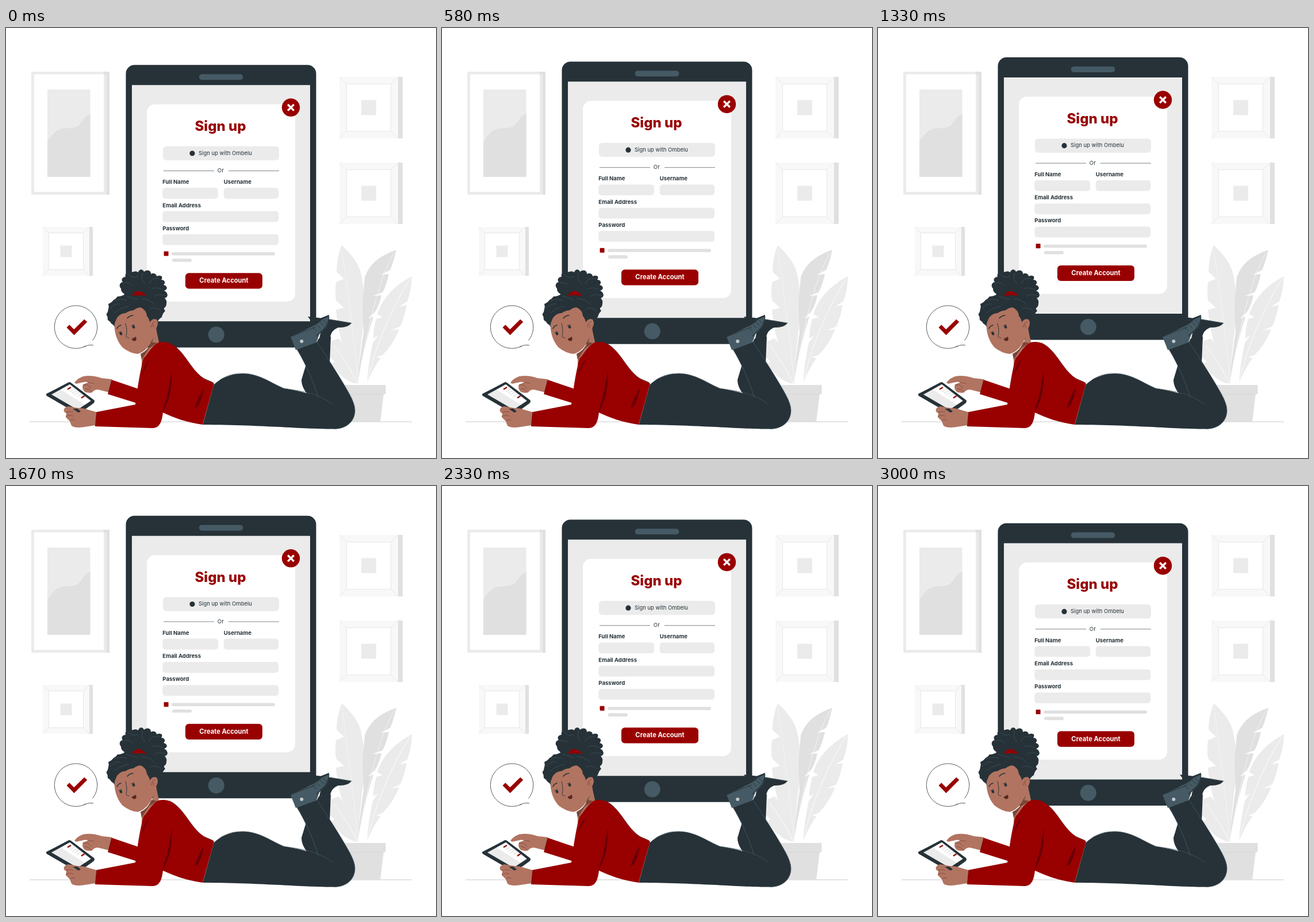
An HTML page with a canvas that plays this animation: 748 px wide and 748 px high, repeating every 3.04 s.

```html
<!DOCTYPE html>
<html lang="en">
<head>
<meta charset="utf-8">
<title>Sign up</title>
<style>
  html, body { margin: 0; width: 100%; height: 100%; overflow: hidden; background: #fff; }
  canvas { display: block; width: 748px; height: 748px; }
</style>
</head>
<body>
<canvas id="stage"></canvas>
<script>
const SIZE = 748, LOOP = 3040, FLOAT = 3000, LIFT = 14.96, STEP = 1000 / 24;
const DARK = '#263238', SLATE = '#455a64', RED = '#990000', DEEP = '#650007';
const SKIN = '#b17461', SHADE = '#7b4537', G1 = '#ebebeb', G2 = '#e0e0e0', G3 = '#f8f8f8';

const canvas = document.getElementById('stage');
const dpr = window.devicePixelRatio || 1;
canvas.width = canvas.height = SIZE * dpr;
const ctx = canvas.getContext('2d');

function fill(d, color) {
  ctx.fillStyle = color;
  ctx.fill(new Path2D(d));
}

function line(d, color, width = 0.7) {
  ctx.strokeStyle = color;
  ctx.lineWidth = width;
  ctx.stroke(new Path2D(d));
}

function box(x, y, w, h, color, r = 0) {
  ctx.fillStyle = color;
  ctx.beginPath();
  ctx.roundRect(x, y, w, h, r);
  ctx.fill();
}

function dot(x, y, r, color, ry = r, turn = 0) {
  ctx.fillStyle = color;
  ctx.beginPath();
  ctx.ellipse(x, y, r, ry, turn, 0, Math.PI * 2);
  ctx.fill();
}

function text(str, x, y, size, weight, color, align = 'left') {
  ctx.font = `${weight} ${size}px Inter, "Open Sans", sans-serif`;
  ctx.textAlign = align;
  ctx.fillStyle = color;
  ctx.fillText(str, x, y);
}

// Closed outline whose edges bulge outwards, walked clockwise
function curls(pts, bulge) {
  let d = `M${pts[0]}`;
  pts.forEach(([x, y], i) => {
    const [u, v] = pts[(i + 1) % pts.length];
    d += `Q${(x + u) / 2 + (v - y) * bulge} ${(y + v) / 2 - (u - x) * bulge} ${u} ${v}`;
  });
  return d + 'Z';
}

function wallFrame(x, y, w, h, side, rim, mid) {
  box(x, y, w + side, h, G2);
  box(x, y, w, h, G3);
  const [l, t, r, b] = [x + rim, y + rim, x + w - rim, y + h - rim];
  box(l, t, r - l, b - t, '#fff');
  line(`M${l} ${t}H${r}V${b}H${l}Z M${x} ${y}L${l} ${t}M${x + w} ${y}L${r} ${t}` +
       `M${x} ${y + h}L${l} ${b}M${x + w} ${y + h}L${r} ${b}`, G2);
  box(x + w / 2 - mid / 2, y + h / 2 - mid / 2, mid, mid, G1);
}

function wall() {
  box(44, 76, 136, 214, G2);
  box(44, 76, 126, 214, G1);
  box(49, 80.5, 121, 204.5, '#fff');
  box(170, 80.5, 5, 209.5, G1);
  box(72, 107, 74.5, 152, G1);
  fill('M72 198C78 188 87 176 99 175C118 173 123 175 130 165C136 157 139 152 146.5 149V259H72Z', G2);
  wallFrame(580, 85, 102, 107, 8, 12.5, 26);
  wallFrame(580, 234, 102, 107, 8, 12.5, 26);
  wallFrame(64, 346, 81, 85, 6, 10.5, 20);
  line('M41 685H706', '#c9c9c9', 1.1);
}

function plant() {
  fill('M612 619C598 617 581 608 566 584L571 580L562 571L566 545L578 540C592 552 604 588 612 619Z', G1);
  fill('M613 619C596 585 578 540 574 490L588 487L574 474Q572 458 574 442L588 436L575 424Q575 400 584 378C601 394 617 411 620 440Q625 466 622 512C617 553 613 590 613 619Z', G1);
  fill('M612 619C614 585 619 550 622 530L620 480L624 434C633 408 653 395 679 386C676 398 673 411 668 421L652 429L666 428Q662 447 655 460L638 466L653 465Q650 481 642 494L630 505L639 502C631 527 618 575 612 619Z', G2);
  fill('M628 619C629 596 633 572 638 548L647 535L639 540Q639 524 644 506L655 503L646 498C655 467 681 445 706 432Q706 455 698 476L684 484L697 482Q694 500 686 519L670 526L684 524Q673 551 655 569L643 573L652 574Q639 590 628 619Z', G1);
  line('M584 384C591 430 605 540 613 619M676 390C650 430 629 520 612 617', '#f5f5f5', 0.9);
  line('M703 436C675 480 642 550 628 619M570 552C588 574 603 600 611 619', '#fff', 0.9);
  fill('M580 636H657L651 685H588Z', G2);
  box(574, 621, 86.5, 16, G2);
  line('M582 637.2H656', '#d6d6d6', 1);
}

function field(label, x, y, w) {
  text(label, x, y - 7, 9.6, 700, DARK);
  box(x, y, w, 18.8, G1, 5);
}

function tablet(lift) {
  ctx.save();
  ctx.translate(0, 0.4 - lift);
  box(208.5, 64.3, 331, 491.4, DARK, 15);
  box(219, 99.2, 310, 411, G1);
  box(335.8, 80.2, 76.5, 10, SLATE, 5);
  dot(365.8, 533.4, 14, SLATE);
  box(245, 132.7, 258, 343, '#fff', 14);

  dot(495.5, 138.3, 15.7, RED);
  ctx.lineCap = 'butt';
  line('M490.2 133L500.8 143.6M500.8 133L490.2 143.6', '#fff', 3.4);

  text('Sign up', 373, 179, 24, 800, RED, 'center');
  box(273, 205.7, 202, 24.5, G1, 6);
  dot(324, 218, 4.6, DARK);
  text('Sign up with Ombelu', 335, 220.7, 9.5, 400, DARK);
  line('M274 248.5H362M387 248.5H475', DARK, 0.6);
  text('Or', 373.3, 251.2, 9.6, 400, DARK, 'center');

  field('Full Name', 272.3, 278.1, 96.8);
  field('Username', 378.8, 278.1, 95.3);
  field('Email Address', 272.3, 318.6, 201.8);
  field('Password', 272.3, 358.8, 201.8);

  box(274.6, 388.6, 8, 8, RED, 1);
  box(288, 390, 180, 5.6, G2, 2.8);
  box(289, 401.2, 34, 5.6, G2, 2.8);
  box(312, 426.2, 134, 27.2, RED, 6);
  text('Create Account', 379, 443.2, 11.2, 700, '#fff', 'center');
  ctx.restore();
}

function badge() {
  fill('M121.5 483A37 37 0 1 0 121.5 557A37 37 0 1 0 121.5 483Z', '#fff');
  line('M139 553A37.2 37.2 0 1 1 150.5 543.5M135 555Q144 550 152 552', DARK, 0.8);
  fill('M105.5 521L110.3 516.3L118.3 524.3L136.2 506.8L141.2 511.2L118.6 534.2Z', RED);
}

function legs() {
  // far leg and shoe
  fill('M525 502L560 506L601.5 513Q594 522 578 521Q565 526 564 539L545 540L549 522L534 514Z', DARK);
  line('M560 507L600 513.5', SLATE, 0.6);
  fill('M544 540L565 537L563 585L556 640L540 652Q514 632 514 612L523 582Z', DARK);
  // near leg
  fill('M361 621C372 610 390 601 412 601C441 601 463 619 484 627C505 630 526 635 542 642C535 614 519 580 506 559L541 546C557 571 580 605 597 636Q607 654 607 665C607 684 593 697 571 697.5C520 698 460 691 342 690Z', DARK);
  line('M372 612C388 602 400 601 412 601C441 601 463 619 484 627C510 631 542 634 568 655', SLATE, 0.7);
  line('M543 643C535 614 519 580 506 559M541 546C557 571 580 605 597 636Q607 654 607 665C607 684 593 697 571 697.5', SLATE, 0.8);
  line('M361 621L342 690', '#a9b2b5', 0.7);
  // near shoe
  fill('M495 537L521 525Q541 514 548 505L562 499Q563 509 557 520L545 533L540 547L504 560Z', SLATE);
  fill('M524 522Q541 514 548 504.5L562 499L561 502L550 507Q540 518 524 522Z', DARK);
  line('M541 517L547 522M546 512L553 518M551 508L557 514M533 521L540 527M495 537L539 520', DARK, 0.9);
  line('M562 502Q560 518 549 527L540 536', DARK, 1.1);
  dot(514.3, 545, 3, '#c4c9cb');
}

function handTablet() {
  fill('M70 636.5Q89 627 109 616.3Q111 615.5 113 617L153.5 647.5Q155 650 152 653L129 669.5Q125 672 121 669L71 640Q69 638 70 636.5Z', DARK);
  fill('M79 637.5L111 620L147.5 648.5L124.5 664Z', G1);
  fill('M95 629L111 620L147.5 648.5L137 655.5Z', '#fff');
  line('M107 628.5L113 625', RED, 2.2);
  line('M131 643.5L136.5 640', RED, 2.4);
  line('M111 633L121 627M115 635.5L125 630M119 638.5L128 633M124 641L132 636', '#c5c5c5', 0.8);
}

function arms() {
  // pointing hand
  fill('M184 611L166 609Q149 603 134 606Q122 611 119.3 617Q121 620 126 618L138 615.5L143 616.5L134 620Q131 627 137 633Q144 636 150 634Q153 629 160 629L180 634Z', SKIN);
  line('M143 616.5L153 618M134 621L142 621L148 627M137 627L144 629L148 633', SHADE, 0.8);
  // holding hand
  fill('M157 668L143 664Q135 661 125 661L108 658Q101 660 100.5 665Q101 669 105 670L104 677L111 684L114 692Q120 696 133 694.5L156 691Z', SKIN);
  fill('M116 662.5L126 669L130 667L124 662Z', DARK);
  line('M105 669Q110 666 117 668M104 676Q110 672 117 675M111 684Q114 680 120 682', SHADE, 0.8);
  fill('M184 612L231 628L235 655L177.5 637Z', RED);
  line('M184 612L177.5 637', DEEP, 0.8);
}

function torso() {
  fill('M236 572C247 563 260 541 260 518L266 546L258 570L236 588Z', SKIN);
  fill('M234 567Q247 561 253 546L263 548L249 557L236 577Z', SHADE);
  fill('M267 546.5C281 544 292 550 302 561C317 577 327 599 345 610L360 616.5Q363 618 361 622L342 690C314 686 292 678 273 669C271 686 267 695.5 255 696L155.5 693L157.5 668L225 655C228 632 232 602 239 575C247 568 254 551 267 546.5Z', RED);
  fill('M288 598C289 619 286 638 281 650L273 669L275 656C282 640 284 620 288 598Z', DEEP);
  fill('M251 576Q240 586 236 604Q242 592 251 576Z', DEEP);
  fill('M344 626.5Q338 635 332 650L328 661L333 659Q341 647 344 626.5Z', DEEP);
  line('M273 669C276 655 286 635 288 598M157.5 668L155.5 693', DEEP, 0.8);
  line('M284 547Q294 552 302 561C317 577 327 599 345 610L360 616.5', DARK, 0.5);
}

function head() {
  fill(curls([[200, 453], [198, 446], [203, 442], [202, 436], [208, 433], [209, 427], [216, 428],
    [222, 424], [230, 425], [235, 420], [240, 424], [249, 422], [252, 428], [260, 428], [262, 432],
    [271, 432], [270, 438], [276, 441], [274, 447], [280, 452], [275, 457], [281, 465],
    [276, 470], [279, 480], [275, 487], [271, 495], [266, 503], [252, 500], [225, 470], [205, 462]], 0.3), DARK);
  fill('M190 492L188.5 519Q190 542 203 556Q216 566 229 567Q241 564 250 551L262 529L258 495L230 480Z', SKIN);
  fill(curls([[222, 461], [207, 463], [194, 467], [187, 473], [178, 480], [178, 489], [174.5, 498],
    [177, 508], [183, 514], [189, 520], [191, 509], [197, 500], [208, 496], [222, 491], [234, 486],
    [242, 492], [245, 501], [250, 512], [263, 512], [271, 503], [277, 492], [272, 480], [262, 467], [244, 460]], 0.16), DARK);
  fill('M219 466Q222 458 231 457.5Q241 460 244 466Q232 464 219 466Z', RED);
  line('M222 465L229 460M228 465L234 460M234 465L239 462', DEEP, 0.7);
  line('M211 427Q220 437 230 432M204 444Q215 440 220 448M238 426Q233 439 243 445M266 436Q252 434 249 445M273 455Q260 449 252 455M279 466Q265 461 258 467' +
    'M180 489Q190 478 199 480M188 475Q200 470 210 474M209 466Q220 470 230 473M235 471Q250 471 259 482M250 489Q260 484 270 492M188 496Q200 486 214 484', SLATE, 0.6);

  fill('M250 512Q255 504 262 507Q266 513 262 521Q257 529 249 527Z', SKIN);
  line('M260 511Q254 511 253 521M254 515Q258 516 257 521', SHADE, 0.8);

  ctx.lineCap = 'round';
  line('M193 523Q195 518 200 517M211 505Q215 500 221 500', DARK, 1.5);
  line('M208 514Q211 526 209.5 533Q207 539 214 539', DARK, 0.9);
  dot(200, 531.7, 2.3, DARK, 2.8, -0.3);
  dot(222, 520, 2.3, DARK, 2.8, -0.3);
  line('M196 530L201 528M218 518L223 516', DARK, 0.9);
  fill('M218.5 541Q222 539 225.5 537Q228 541 225.5 544Q221 546 218.5 541Z', '#562923');
  ctx.lineCap = 'butt';
}

function draw(now) {
  // The float is one step ahead of the loop clock and rests at its end
  const i = Math.floor((now % LOOP + 5) / STEP) + 1;
  const t = Math.min(i * STEP, FLOAT);
  const lift = LIFT * (1 - Math.abs(1 - 2 * t / FLOAT));

  ctx.setTransform(dpr, 0, 0, dpr, 0, 0);
  ctx.fillStyle = '#fff';
  ctx.fillRect(0, 0, SIZE, SIZE);
  wall();
  plant();
  tablet(lift);
  badge();
  legs();
  handTablet();
  arms();
  torso();
  head();
}

let start;
function tick(now) {
  start ??= now;
  draw(now - start);
  requestAnimationFrame(tick);
}
draw(0);
requestAnimationFrame(tick);
</script>
</body>
</html>
```
